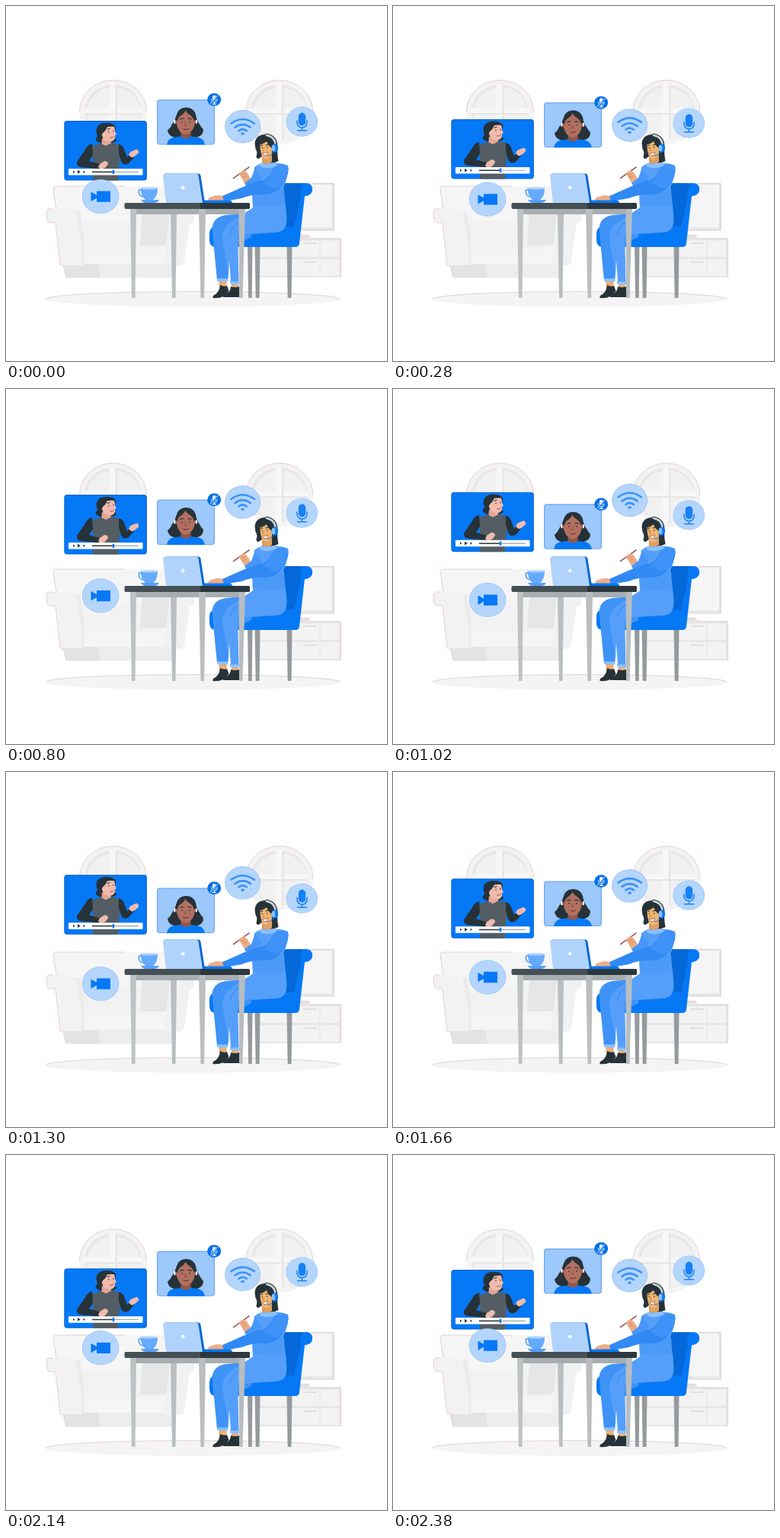
Recreate the animation shown at these times as an HTML page. Size 500x467 px, loop 2400 ms.

```html
<!DOCTYPE html>
<html lang="en">
<head>
<meta charset="utf-8">
<title>Video meeting</title>
<style>
html, body { margin: 0; width: 100%; height: 100%; overflow: hidden; background: #fff; }
svg { display: block; width: 100vw; height: 100vh; }
.line { fill: none; stroke-linecap: round; stroke-linejoin: round; }
.rim { fill: none; stroke: #e9cfcf; stroke-width: 1; }
</style>
</head>
<body>
<svg viewBox="0 0 500 467" xmlns="http://www.w3.org/2000/svg">
<defs>
  <clipPath id="cardA"><rect x="76.3" y="151" width="108.6" height="78.5" rx="4"/></clipPath>
  <clipPath id="cardB"><rect x="198" y="123" width="76" height="59.5" rx="4"/></clipPath>
  <g id="window">
    <ellipse rx="44.3" ry="42.3" fill="#f3f3f3"/>
    <path d="M-44 0A44 42 0 0 1 44 0" class="rim"/>
    <ellipse rx="37.5" ry="36" fill="#e7e7e7"/>
    <ellipse cx="1" cy="1.5" rx="35.5" ry="34" fill="#f1f1f1"/>
    <path d="M-5-37h9v74h-9zM-38-5h76v7h-76z" fill="#f7f7f7"/>
    <path d="M3-36h2.500v72h-2.500zM-37 1.500h74v2h-74z" fill="#e6e6e6"/>
  </g>
</defs>

<!-- room -->
<ellipse cx="245" cy="385.700" rx="193.500" ry="10" fill="#f4f4f4"/>
<path d="M51.500 385.700A193.500 10 0 0 1 438.500 385.700" class="rim"/>
<use href="#window" x="140.500" y="139.500"/>
<use href="#window" x="358.800" y="139.500"/>

<g id="sofa">
  <path d="M62 241q0-4 4-4H228q5 0 5 5L230 342H76z" fill="#f5f5f5"/>
  <path d="M75 339H218V357.500H79z" fill="#ededed"/>
  <path d="M75 339H121L124 357.500H79z" fill="#e3e3e3"/>
  <path d="M98 283H208L205 320H98z" fill="#f2f2f2"/>
  <path d="M179 270H216L210 315H176z" fill="#e6e6e6"/>
  <path d="M53 272q0-5 5-5H84q6 0 7 7L99 314V341H71L65 285H58q-4 0-4-4z" fill="#f2f2f2"/>
  <path d="M91 270L99 314V341H103L102 300L97 270z" fill="#ebebeb"/>
  <path d="M216 267H240q7 0 7 7V281q0 5-6 5L234 336q-1 5-5 5H207z" fill="#f1f1f1"/>
  <path d="M156 237H66q-4 0-4 4L66 267M62 267H57q-4 0-4 5L54 281q1 4 4 4H65L71 341H75L79 357" class="rim"/>
</g>

<g id="cabinet">
  <path d="M384 233H430.500V296H384z" fill="#e4e4e4"/>
  <path d="M384 235H428V291.500H384z" fill="#f5f5f5"/>
  <path d="M380 301H397v6H380z" fill="#e2e2e2"/>
  <path d="M330 305.500H440V357H330z" fill="#e6e6e6"/>
  <path d="M330 308.500H437V330H330zM330 333H437V355H330z" fill="#f3f3f3"/>
  <path d="M412 308V356" stroke="#e8e8e8" stroke-width="1.500"/>
  <path d="M390 312H408M390 337H408" stroke="#e0e0e0" stroke-width="2"/>
  <path d="M402 233.300H430V296M385 301.300H397L399 306H439.500V356" class="rim"/>
</g>

<!-- floating cards -->
<g data-rise="-16">
  <rect x="76.300" y="151" width="108.600" height="78.500" rx="4" fill="#0562ce"/>
  <rect x="77.300" y="152" width="106.600" height="76.500" rx="3.500" fill="#0578f6"/>
  <g clip-path="url(#cardA)">
    <path d="M118.500 165q0-10 11-11q12-1 15 6L142 168q0 6 3.500 9q-5 4-12 2q-8 3-12 0q-4-1-4-5q3-1 2-5z" fill="#263238"/>
    <path d="M126 174h11l2 12-8 4-6-5z" fill="#e3a597"/>
    <path d="M126 163q3-5 8-6q5-1 8 1q1 4 1 7l2 4-2 1q1 6-4 8q-8 2-12-5l-1-3q-4-1-3-5z" fill="#f0bbac"/>
    <path d="M119 167q-1-12 11-13q10-1 14 5q-6-1-11 0q-2 5-6 8l-3 6z" fill="#263238"/>
    <path d="M135 165v1M141 164v1M133 162.300l3-1" class="line" stroke="#263238" stroke-width="1.100"/>
    <path d="M136.500 173q3.500 .8 5-1.300" class="line" stroke="#a94e4e" stroke-width="1"/>
    <path d="M111 186q6-4 14-5l6 3 8-4q9 1 13 5l-3 19-2 26H114l1-24z" fill="#545d63"/>
    <path d="M113 181q-6 1-9 8L93 205q-1 6 6 7L122 214l1-6-14-4 5-8z" fill="#263238"/>
    <path d="M148 182q6 1 8 9l3 8 5-5 4 5-7 8q-7 4-10-3l-3-10z" fill="#263238"/>
    <path d="M121 212l2-4 6-4q5 0 5 4l-4 5-6 2z" fill="#f0bbac"/>
    <path d="M161 196l2-4 8-3.500q4 1 3 5l-5 4-4 2z" fill="#f0bbac"/>
  </g>
  <rect x="82" y="214" width="97.500" height="8.500" rx="1" fill="#fff"/>
  <path d="M88 216.500l2.500 1.700-2.500 1.700zM94 215.800l3.800 2.400-3.800 2.400zM101.500 216.500l2.500 1.700-2.500 1.700z" fill="#263238"/>
  <path d="M113 218.300H140" stroke="#263238" stroke-width="1.500"/>
  <path d="M140 218.300H174" stroke="#9aa3a8" stroke-width="1.200"/>
  <rect x="139.800" y="215.500" width="2.400" height="5.600" fill="#0578f6"/>
</g>

<g data-rise="30">
  <rect x="198" y="123" width="76" height="59.500" rx="4" fill="#6ea9ea"/>
  <rect x="199.200" y="124.200" width="73.600" height="57.300" rx="3" fill="#9cc8fb"/>
  <g clip-path="url(#cardB)">
    <path d="M224 143q2-9 12-9.500q10 0 13 9q1 8 5 13q2 4 5 7q0 8-8 10l-4 3H224l-4-3q-7-2-8-9q4-3 6-8q4-5 6-12z" fill="#263238"/>
    <path d="M230 162H242l1 13H229z" fill="#925749"/>
    <path d="M211 183q1-8 8-10l10-1.500q7 6 14 0l10 1.500q7 2 8 10z" fill="#0578f6"/>
    <path d="M223.500 150q0-12 12-13q12 1 12.500 13q0 9-4 14q-4 5-8 5q-5 0-8.500-5q-4-6-4-14z" fill="#b17060"/>
    <path d="M222 153q0-16 14-17q-1 4-5 7q-6 3-6 10zM249 153q-1-16-14-17q2 5 6 7q5 3 6 10z" fill="#263238"/>
    <circle cx="222.500" cy="152.500" r="2.300" fill="#b17060"/>
    <circle cx="249" cy="152.500" r="2.300" fill="#b17060"/>
    <path d="M221.300 150.500v3.500M250 150.500v3.500" class="line" stroke="#fff" stroke-width="1.700"/>
    <path d="M231 152v1M241 152v1M229 148.800q2-1.300 4-.5M239 148.300q2-.8 4 .5" class="line" stroke="#263238" stroke-width="1.200"/>
    <path d="M236 153l-1.300 4h2" class="line" stroke="#7c463c" stroke-width=".8"/>
    <path d="M233 161.500q3 2 6.500 0" class="line" stroke="#642f2c" stroke-width="1.100"/>
  </g>
  <ellipse cx="273.200" cy="123.200" rx="9" ry="8.400" fill="#0570e6"/>
  <rect x="271" y="117.500" width="4.600" height="7.500" rx="2.300" fill="#fff"/>
  <path d="M269.500 122.500q0 4.300 3.800 4.300t3.800-4.300M273.300 127v2M271 129h4.600" class="line" stroke="#fff" stroke-width="1"/>
  <path d="M268.500 128.500L278 118" class="line" stroke="#0570e6" stroke-width="2.200"/>
  <path d="M268.300 128.300L277.800 117.800" class="line" stroke="#fff" stroke-width="1"/>
</g>

<g data-rise="-13">
  <ellipse cx="310.600" cy="158.600" rx="23.400" ry="21.800" fill="#8fbdf0"/>
  <ellipse cx="310.600" cy="158.600" rx="22.800" ry="21.200" fill="#b4d5fc"/>
  <path d="M295.500 154.500q15-11 30.400 0M300.500 159.700q10-7.500 20.300 0M305.500 164.200q5-4 10.300 0" class="line" stroke="#3a93f8" stroke-width="2.600"/>
  <ellipse cx="310.600" cy="168" rx="2.300" ry="1.800" fill="#3a93f8"/>
</g>

<g data-rise="14.500">
  <ellipse cx="388.300" cy="152.200" rx="20.900" ry="19.600" fill="#9fc7f3"/>
  <ellipse cx="388.300" cy="152.200" rx="20.300" ry="19" fill="#b4d5fc"/>
  <rect x="383.800" y="140.500" width="9.400" height="17" rx="4.700" fill="#1780f4"/>
  <path d="M381.800 151q0 9 6.700 9t6.700-9M388.500 160v3.500M382.500 163.800h12" class="line" stroke="#1780f4" stroke-width="1.500"/>
</g>

<g data-rise="28.500">
  <ellipse cx="124.100" cy="250.500" rx="24.300" ry="22.600" fill="#96c2f4"/>
  <ellipse cx="124.100" cy="250.500" rx="23.700" ry="22" fill="#b4d5fc"/>
  <path d="M111.500 244.500L119 248.700V243.500H137V257.800H119V252.500L111.500 257z" fill="#0578f6"/>
</g>

<!-- chair -->
<g>
  <path d="M317 315h6.500l-.8 69h-4.600zM326.500 315h7l-1 69h-4.800zM368.500 315h7l-1 69h-4.800z" fill="#959a9c"/>
  <path d="M361 238q1-5 8-5H394q8 1 8 9q-1 7-10 8L385 312q0 5-6 5H346z" fill="#0578f6"/>
  <path d="M360 240q1-7 10-7H386q5 2 3 9L378 290H360z" fill="#0568d8"/>
  <path d="M388 238q-3 5-1 12l5 0q10-1 10-9t-9-8q-4 0-5 5z" fill="#0578f6"/>
  <path d="M267 299q0-9 10-9H382l3 20q0 7-7 7H276q-9 0-9-9z" fill="#0578f6"/>
</g>

<!-- woman -->
<g>
  <path d="M279 361h11l-1 10h-9zM296 364h9v9h-9z" fill="#edae76"/>
  <path d="M281 367q5 3 9 1l2.500 7-7 7q-7 3-14 2q-1-3 4-5q5-5 5.500-12z" fill="#263238"/>
  <path d="M295 369q6 2 11 0q4 7 2 14H285q0-4 6-6q4-3 4-8z" fill="#263238"/>
  <path d="M324 272L288 275q-17 3-17.500 18L277 361q8 2 14.500 0L294 318l28-14z" fill="#3f93f6"/>
  <path d="M326 264H366q5 18 0 28q-4 6-14 6L304 301q1 32 1.500 64q-5 1.500-11 0L284 308q-1-16 13-25z" fill="#559ffa"/>
  <path d="M276.700 358.500h15l-.3 3.500q-8 1.500-14.300 0zM294 362.500h11.800v3.500q-6 1.500-11.300 0z" fill="#8fc1fd"/>
  <path d="M291.500 361l1.500-26 2 27z" fill="#fff"/>
  <path d="M294 300q3-12 12-16" class="line" stroke="#3687ea" stroke-width="1"/>

  <path d="M336 198h15v14h-15z" fill="#dd9a62"/>
  <path d="M326 212q6-5 12-5h12q14-1 20 4q1 12-6 28l4 32q-22 5-44-2l-1-28z" fill="#559ffa"/>
  <path d="M323 240H365L366 262q-20 3-42 0z" fill="#4b9af8"/>
  <path d="M334 206q9 4 19-2l3 6q-12 6-23 1z" fill="#8bc0fd"/>

  <!-- bob, face and headset -->
  <path d="M326.500 181q1-12 14-12q15 0 16 15q-1 9 1 20q-6 3-13 2l-6-10-7 5q-3 0-3-3q2-6-1-10z" fill="#263238"/>
  <path d="M338 196l11-5v14q-6 4-10 0z" fill="#e0a062"/>
  <path d="M333.500 182q3-5 7-6q7 0 9 7q0 8-2 13q-2 5-6 5.500q-4 0-6-5q-2.500-7-2-14.500z" fill="#efb571"/>
  <path d="M332 184q0-8 9-11q6 2 9 10l-1 4q-5-3-7-9q-5 4-8.500 4z" fill="#263238"/>
  <path d="M336.200 186v1M342.800 185.500v1M334.500 183.600l2.300-.7M341 182.800l3-.3" class="line" stroke="#263238" stroke-width="1"/>
  <path d="M338.500 187l-1.500 3.500h1.800" class="line" stroke="#c77c4c" stroke-width=".8"/>
  <path d="M336.500 193.500q4 .5 7-1.500q-.5 5-3.500 4.700q-2.500 0-3.500-3.200z" fill="#fff" stroke="#9d453c" stroke-width=".7"/>
  <path d="M342 170q11 2 11.500 13" class="line" stroke="#263238" stroke-width="4.500"/>
  <path d="M342 170q11 2 11.500 13" class="line" stroke="#c8d8d8" stroke-width="2.700"/>
  <ellipse cx="352.800" cy="187" rx="4.300" ry="5.800" fill="#0578f6"/>
  <ellipse cx="351" cy="187" rx="2.400" ry="4.200" fill="#86bffd"/>
  <path d="M350.500 192q-2 5-7 5" class="line" stroke="#0578f6" stroke-width="1"/>

  <!-- raised hand -->
  <path d="M298.500 226.500L319 212" class="line" stroke="#9e6670" stroke-width="1.700"/>
  <path d="M305 220l7-4 4 3 4 6 2 7-7 4-6-10z" fill="#ecac83"/>
  <path d="M309 222l5-1M311 225l4-1" class="line" stroke="#c77c5c" stroke-width=".7"/>
  <path d="M313 233l9-7 5-13 8 12-3 15-13 4z" fill="#4697f8"/>

  <!-- typing arm -->
  <path d="M265 253.500q6-4.500 14-4.500l7 1 1 6-9 2H267z" fill="#eead86"/>
  <path d="M352 212q10-6 18-2q3 10-7 25-9 13-23 13-16-1-31 5l-23 4-2-7 27-12 21-8q11 1 20-18z" fill="#3089f5"/>
  <path d="M352 212q10-6 18-2q2 10-8 25-6 7-12 4-8-5-13-7 9-4 15-20z" fill="#3f92f8"/>
</g>

<!-- table -->
<g>
  <path d="M216 270h8l-1.500 114h-4.500z" fill="#b9bec0"/>
  <path d="M167 266H308V274H167z" fill="#a7adb0"/>
  <path d="M163 266h8l-1.500 118h-4.500z" fill="#bdc2c4"/>
  <path d="M253 266h9l-2 118h-4.500z" fill="#bcbdbf"/>
  <path d="M305.500 266h8.500l-3.500 118h-4.500z" fill="#b8bdc0"/>
  <rect x="155.500" y="259" width="164.500" height="8" rx="2" fill="#455055"/>
  <path d="M255 259H318q2 0 2 2v4q0 2-2 2H255z" fill="#2c383e"/>
</g>

<!-- cup and laptop -->
<g>
  <path d="M177 242h-2.500q-1 9 6 8.500" class="line" stroke="#559ffa" stroke-width="1.700"/>
  <path d="M176.500 239.500H199q0 11-6 15.500H183q-6-5-6.500-15.500z" fill="#65aafb"/>
  <ellipse cx="187.800" cy="240" rx="11.200" ry="1.600" fill="#a9d0fd"/>
  <path d="M177 255H201q-2 4-7 4H184q-5 0-7-4z" fill="#559ffa"/>
  <path d="M258 255.500H295l2.500 3.500H258z" fill="#0578f6"/>
  <path d="M209 220.500H252q3 0 3.500 3L261 259H214z" fill="#0567d2"/>
  <path d="M206 223q0-2.500 3-2.500H249.500q2.500 0 3 2.500L258 259H212q-2 0-2.200-2z" fill="#b0d3fc"/>
  <circle cx="232.200" cy="239" r="2.400" fill="#f2f8ff"/>
</g>
</svg>
<script>
const LOOP = 2400;
const cards = [...document.querySelectorAll('[data-rise]')];

// every card drifts to its far end and back on one cosine
function draw(now) {
  const k = (1 - Math.cos(2 * Math.PI * (now % LOOP) / LOOP)) / 2;
  for (const card of cards) {
    card.setAttribute('transform', `translate(0 ${(card.dataset.rise * k).toFixed(2)})`);
  }
}

let start;
function tick(now) {
  start ??= now;
  draw(now - start);
  requestAnimationFrame(tick);
}
draw(0);
requestAnimationFrame(tick);
</script>
</body>
</html>
```
